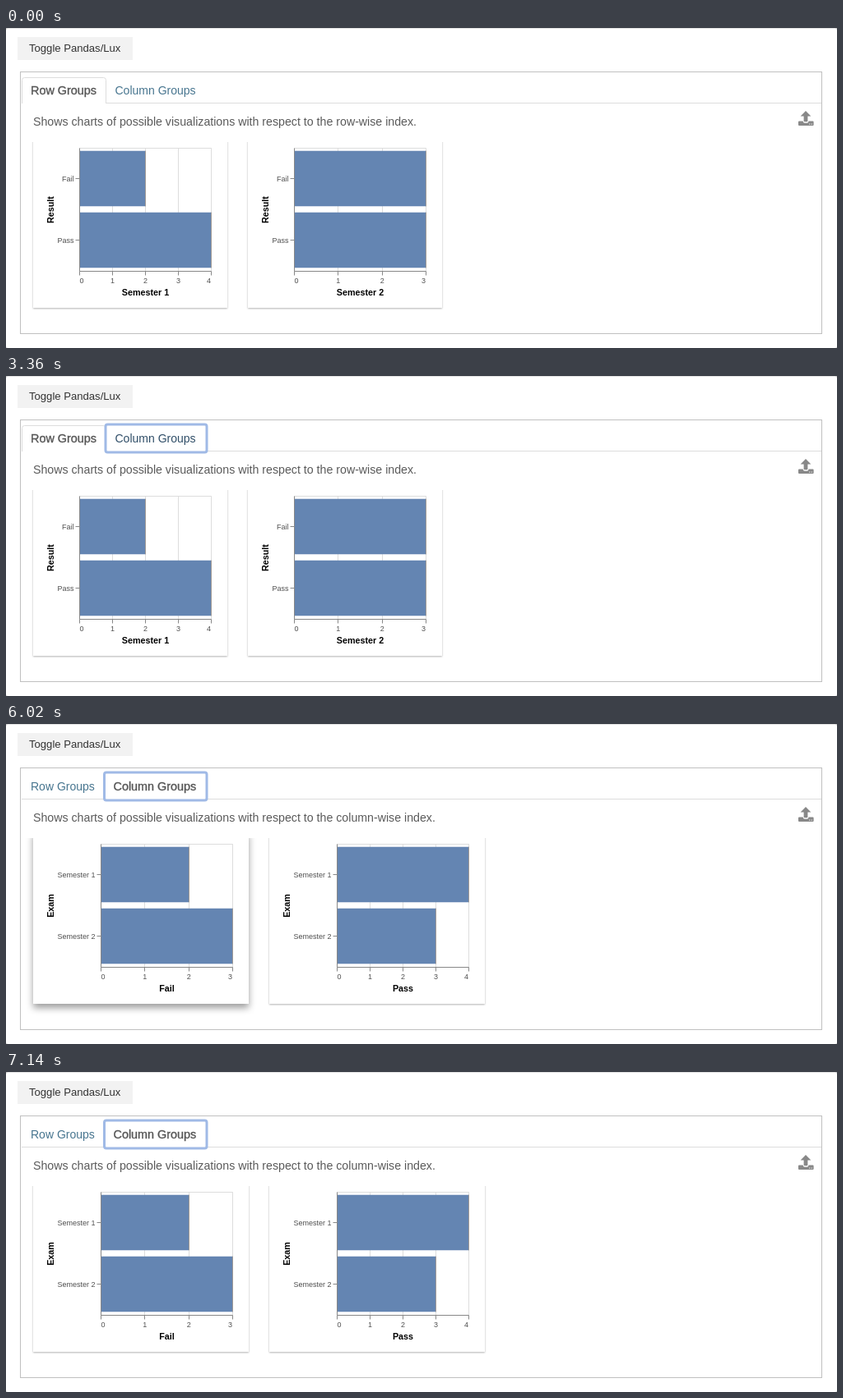
Recreate the animation shown at these times as an HTML page. Size 1010x390 px, loop 7.21 s.

```html
<!DOCTYPE html>
<html lang="en">
<head>
<meta charset="utf-8">
<title>Index group charts</title>
<style>
  html, body { margin: 0; width: 100%; height: 100%; overflow: hidden; background: #fff; }
  svg { display: block; width: 1010px; height: 390px; font-family: "Liberation Sans", Arial, sans-serif; }
  .body { font-size: 14.2px; fill: #5a5a5a; }
  .link { font-size: 14px; fill: #47758f; }
  .active { font-size: 14.4px; fill: #555; stroke: #555; stroke-width: .35px; }
  .label { font-size: 9px; fill: #505050; }
  .title { font-size: 10.75px; font-weight: bold; fill: #000; text-anchor: middle; }
  .bar { fill: #6485b2; }
  .grid { stroke: #ddd; fill: none; }
  .axis { stroke: #888; fill: none; }
  .edge { stroke: #a09a96; }
  .ring { fill: #fff; stroke: #a0bae6; stroke-width: 3; }
</style>
</head>
<body>
<svg id="stage" viewBox="0 0 1010 390"></svg>
<script>
const LOOP = 7210, STEP = 70, SWITCH = 3430;
const PLOT_W = 160, TOP = 146.5, BOTTOM = 296.5, BAND = 75;

const text = (x, y, cls, str, extra = '') => `<text x="${x}" y="${y}" class="${cls}" ${extra}>${str}</text>`;
const path = (d, cls) => `<path d="${d}" class="${cls}"/>`;

function chart({ id, x, width, plot, max, values, names, xTitle, yTitle }) {
  const px = v => plot + PLOT_W * v / max;
  const snap = v => Math.floor(px(v)) + .5;
  const ticks = Array.from({ length: max + 1 }, (_, i) => i);
  const mid = (TOP + BOTTOM) / 2;

  const grid = ticks.map(v => path(`M${snap(v)} ${TOP}V${BOTTOM}`, 'grid')).join('');
  const bars = values.map((v, i) => {
    const y = TOP - .5 + BAND * i + 3.75;
    return `<rect class="bar" x="${plot}" y="${y}" width="${px(v) - plot}" height="67.5"/>`
      + path(`M${snap(v)} ${y}v67.5`, 'edge');
  }).join('');
  const xAxis = ticks.map(v => {
    const anchor = v === 0 ? 'start' : v === max ? 'end' : 'middle';
    return path(`M${snap(v)} ${BOTTOM}v5`, 'axis')
      + text(px(v) - (v === max ? .5 : 0), 311, 'label', v, `text-anchor="${anchor}"`);
  }).join('');
  const yAxis = names.map((name, i) => {
    const y = TOP + BAND * (i + .5) - .5;
    return path(`M${plot} ${y}h-5`, 'axis') + text(plot - 7, y + 3.2, 'label', name, 'text-anchor="end"');
  }).join('');

  return `<rect id="${id}" x="${x}" y="130" width="${width}" height="211" fill="#fff"/>`
    + path(`M${plot} ${TOP}h${PLOT_W}V${BOTTOM}h${-PLOT_W}z`, 'grid') + grid + bars
    + path(`M${plot} ${TOP}V${BOTTOM}h${PLOT_W}`, 'axis') + xAxis + yAxis
    + text(plot + PLOT_W / 2, 326, 'title', xTitle)
    + text(0, 0, 'title', yTitle, `transform="translate(${x + 24.5} ${mid}) rotate(-90)"`);
}

const results = { names: ['Fail', 'Pass'], yTitle: 'Result', width: 236 };
const exams = { names: ['Semester 1', 'Semester 2'], yTitle: 'Exam', width: 262 };

const rowCharts =
  chart({ ...results, id: 'sem1', x: 33, plot: 89.5, max: 4, values: [2, 4], xTitle: 'Semester 1' })
  + chart({ ...results, id: 'sem2', x: 294, plot: 350.5, max: 3, values: [3, 3], xTitle: 'Semester 2' });
const columnCharts =
  chart({ ...exams, id: 'fail', x: 33, plot: 115.5, max: 3, values: [2, 3], xTitle: 'Fail' })
  + chart({ ...exams, id: 'pass', x: 320, plot: 402.5, max: 4, values: [4, 3], xTitle: 'Pass' });

const uploadIcon = `<g fill="#888">
  <path d="M972 101l6.4 6.6h-4v5.6q0 1-1 1h-2.8q-1 0-1-1v-5.6h-4z"/>
  <path d="M964 113.6h4.6q.4 2.2 2.2 2.2h2.6q1.8 0 2.2-2.2h5q1 0 1 1v3.4q0 1-1 1h-16.600q-1 0-1-1v-3.400q0-1 1-1z"/>
  <path d="M976 116.500h1.300v1.200h-1.300zM978.600 116.500h1.300v1.200h-1.300z" fill="#ddd"/></g>`;

const sentence = kind => text(33, 119, 'body', `Shows charts of possible visualizations with respect to the ${kind}-wise index.`);

document.getElementById('stage').innerHTML = `
  <defs><clipPath id="gallery"><rect x="18" y="139" width="973" height="233"/></clipPath></defs>
  <rect width="1010" height="390" fill="#c8c8c8"/>
  <rect y=".5" width="1010" height="389.5" rx="2.500" fill="#fff"/>
  <rect x="14" y="11" width="140" height="28" fill="#f2f2f2"/>
  ${text(28, 29, 'body', 'Toggle Pandas/Lux', 'style="font-size:13.1px;fill:#333"')}
  <rect x="17.5" y="53.5" width="974" height="319" fill="#fff" stroke="#c0c0c0"/>
  ${path('M19 91.5H991', 'grid')}
  ${uploadIcon}
  <g id="rowView">
    <path d="M19.500 92V63.500q0-3 3-3h96q3 0 3 3V92" fill="#fff" stroke="#ddd"/>
    ${text(30, 81, 'active', 'Row Groups')}
    <rect id="ring" class="ring" x="121" y="59" width="123" height="34" rx="2.500"/>
    ${text(132.500, 81, 'link', 'Column Groups', 'id="columnLink"')}
    ${sentence('row')}
    <g clip-path="url(#gallery)">${rowCharts}</g>
  </g>
  <g id="columnView">
    <rect class="ring" x="119.500" y="59" width="124.500" height="34" rx="2.500"/>
    ${text(30, 81, 'link', 'Row Groups')}
    ${text(130.500, 81, 'active', 'Column Groups')}
    ${sentence('column')}
    <g clip-path="url(#gallery)">${columnCharts}</g>
  </g>`;

const el = id => document.getElementById(id);
const mix = (a, b, k) => a + (b - a) * k;
function ramp(t, from, to) {
  const k = Math.min(1, Math.max(0, (t - from) / (to - from)));
  return k * k * (3 - 2 * k);
}

function lift(id, k) {
  el(id).style.filter =
    `drop-shadow(0 ${mix(1, 7, k)}px ${mix(1, 6, k)}px rgba(0,0,0,${mix(.3, .42, k)}))`;
}

function render(time) {
  const t = Math.floor((time % LOOP) / STEP) * STEP;
  const onColumns = t >= SWITCH;
  el('rowView').style.display = onColumns ? 'none' : '';
  el('columnView').style.display = onColumns ? '' : 'none';

  const hover = ramp(t, 3010, 3220);
  el('columnLink').style.fill = `rgb(${mix(71, 48, hover)},${mix(117, 78, hover)},${mix(143, 104, hover)})`;
  el('ring').style.opacity = ramp(t, 3150, 3360);

  lift('sem1', 0);
  lift('sem2', 0);
  lift('fail', ramp(t, 5900, 6090) - ramp(t, 6190, 6500));
  lift('pass', .25 * (ramp(t, 6300, 6440) - ramp(t, 6440, 6650)));
}

const start = performance.now();
function tick() {
  render(performance.now() - start);
  requestAnimationFrame(tick);
}
tick();
</script>
</body>
</html>
```
